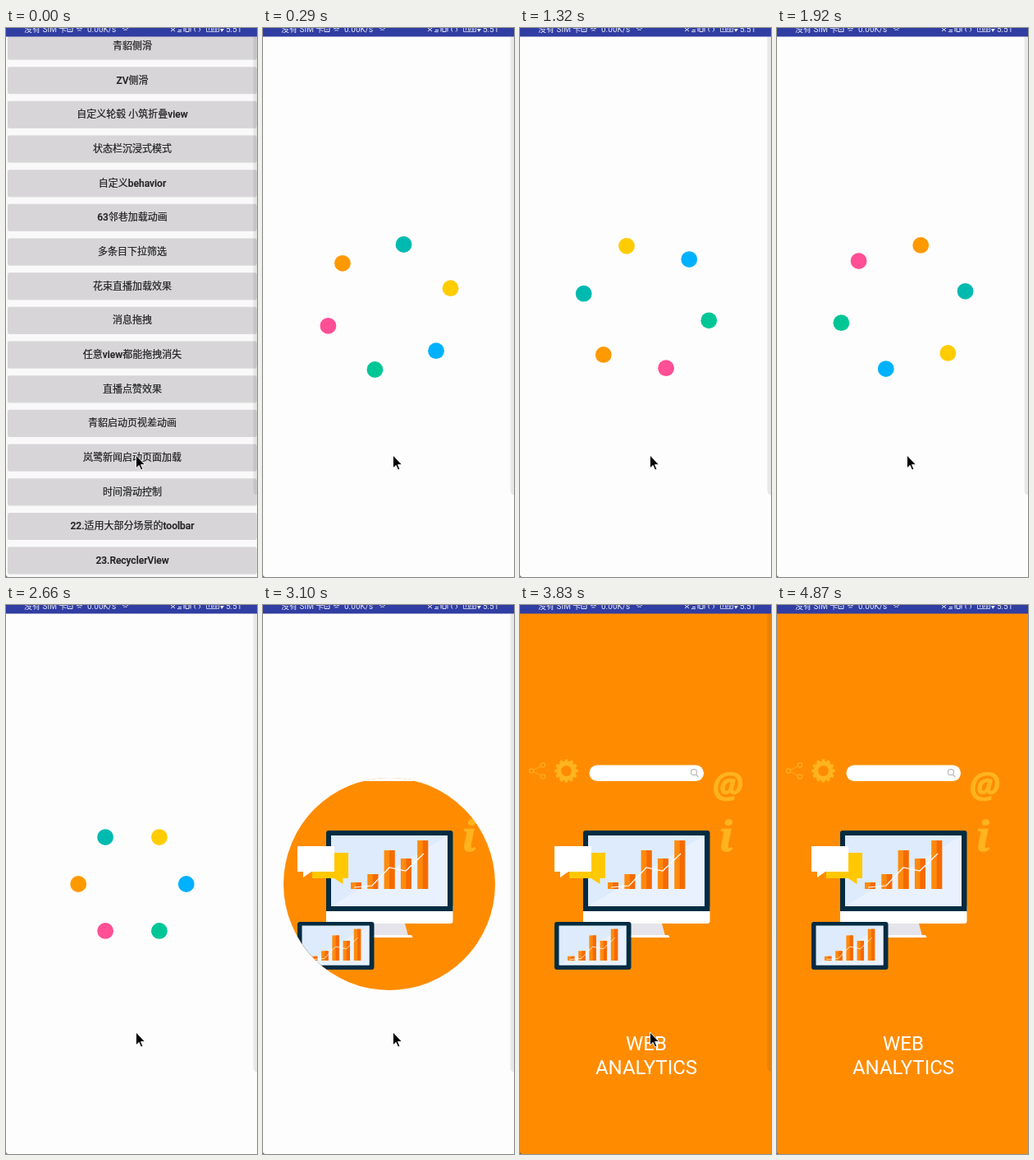
Animation, 306 px wide and 667 px high, one loop 4970 ms. Source, as an HTML page:

```html
<!DOCTYPE html>
<html lang="zh">
<head>
<meta charset="utf-8">
<title>Loading splash</title>
<style>
  html, body { margin: 0; width: 100%; height: 100%; overflow: hidden; background: #fdfdfd; }
  svg { display: block; width: 100%; height: 100%; }
  text { font-family: Roboto, "Noto Sans CJK SC", "Noto Sans CJK", sans-serif; }
  #list text { font-size: 12px; font-weight: 500; fill: #222; stroke: #222; stroke-width: .22; text-anchor: middle; }
  #status text { font-size: 10px; fill: #e4e6f6; }
  .title { font-size: 24px; fill: #fff; text-anchor: middle; }
</style>
</head>
<body>
<svg viewBox="0 0 306 667">
  <defs>
    <clipPath id="hole"><circle id="holeCircle" cx="154" cy="339" r="0"/></clipPath>
    <linearGradient id="shade">
      <stop offset="0" stop-opacity=".03"/>
      <stop offset=".4" stop-opacity=".085"/>
    </linearGradient>
    <g id="chart"></g>
  </defs>

  <rect width="306" height="667" fill="#fdfdfd"/>
  <g id="list"><rect width="306" height="667" fill="#faf9fa"/></g>
  <g id="dots"></g>

  <g id="splash" clip-path="url(#hole)">
    <rect width="306" height="667" fill="#ff8c00"/>
    <g fill="none" stroke="#ffab24">
      <path d="M28 194.500L14.500 201.500L28 208.500" stroke-width="1"/>
      <g fill="#ff8c00" stroke-width="1.200">
        <circle cx="28" cy="194.500" r="2.600"/>
        <circle cx="14" cy="201.500" r="2.600"/>
        <circle cx="28" cy="208.500" r="2.600"/>
      </g>
    </g>
    <g fill="none" stroke="#ffb41e">
      <circle cx="56.500" cy="201.500" r="9.200" stroke-width="5.400"/>
      <circle cx="56.500" cy="201.500" r="12.700" stroke-width="3" pathLength="24" stroke-dasharray="1.150 .85" stroke-dashoffset=".575"/>
    </g>
    <rect x="84.500" y="194.500" width="139.500" height="19.500" rx="9.750" fill="#fff"/>
    <path d="M214.500 206l3 3M215.500 203.200a3.500 3.500 0 1 1-7 0a3.500 3.500 0 1 1 7 0" fill="none" stroke="#b9b9b9" stroke-width="1.200"/>
    <g fill="#ffb41e" stroke="#ffb41e" stroke-width=".7" text-anchor="middle" font-weight="700">
      <text x="253" y="233.500" font-size="43" font-style="italic" style="font-family:'Open Sans','Noto Sans',sans-serif">@</text>
      <text x="251" y="299" font-size="50" font-style="italic" style="font-family:'Noto Serif',serif">i</text>
    </g>

    <path d="M135 387h38l4 15h-42z" fill="#e5e4ea"/>
    <path d="M129 404l1-3h51l1.500 3z" fill="#fff"/>
    <rect x="77" y="364" width="154.500" height="23" rx="3" fill="#fff"/>
    <path d="M77 372V277q0-3 3-3h148.500q3 0 3 3v95z" fill="#022c42"/>
    <rect x="83" y="280" width="142" height="86" fill="#ddebfc"/>
    <path d="M83 366L225 280v86z" fill="#e8f1fd"/>
    <use href="#chart"/>

    <path d="M60 301h44v31h-6.500v7l-11-7H60z" fill="#ffc800"/>
    <path d="M42 293h45v31H59l-10 7v-7h-7z" fill="#fff"/>

    <rect x="42" y="385" width="93.500" height="58" rx="3" fill="#022c42"/>
    <rect x="47.500" y="389.500" width="82" height="48" fill="#ddebfc"/>
    <path d="M47.500 437.500L129.500 389.500v48z" fill="#e8f1fd"/>
    <use href="#chart" transform="translate(-11.550 207.750) scale(.65)"/>

    <text class="title" x="154" y="541">WEB</text>
    <text class="title" x="154" y="570">ANALYTICS</text>
  </g>

  <g id="status">
    <rect width="306" height="10.500" fill="#303da2"/>
    <text x="22" y="5">没有 SIM 卡</text>
    <text x="99" y="5">0.00K/s</text>
    <text x="268" y="5">5:51</text>
    <g fill="none" stroke="#e4e6f6">
      <path d="M75 0v4.500h6V0M77 2h2M86 1q3.500-2 7 0M87.500 3.200q2-1.200 4 0M142 .5q3.500-2 7 0M143.500 2.500q2-1.200 4 0M201 0l5 4M206 0l-5 4M209 4.500h5M210 2.500h4M217 0v4.500M219 0v4.500h4V0M225 0v4.500M230 0q-1 3 1 4.500M236 0q2 3-1 4.500"/>
      <path d="M244.500 0v4.500h15V0M247.500 0v3M250.500 0v3h2V0M255 0v3h2V0" stroke-width=".8"/>
    </g>
    <path d="M261 1h5l-3 4z" fill="#e4e6f6"/>
  </g>

  <path id="strip" d="M306 10.500h-5v550q0 6 5 7z" fill="url(#shade)"/>
  <path d="M0 664q0 3 3 3H0z" fill="#555"/>
  <path id="cursor" d="M158.500 519v15.800l3.700-3.400 2.400 5.700 2.300-1-2.400-5.500h5z" stroke="#fff" stroke-width=".9"/>
</svg>

<script>
const LOOP = 4970, STEP = 147.6;
const SPIN = 0.2604;                      // degrees per ms
const MERGE_AT = 2090, HOLE_AT = 2815, PHASE = 700;
const CX = 154, CY = 339, RADIUS = 78, DIAGONAL = 363;
const COLORS = ['#ff9900', '#00bab0', '#ffcc00', '#00b1ff', '#00c696', '#ff4f95'];
const LABELS = [
  '青貂侧滑', 'ZV侧滑', '自定义轮毂 小筑折叠view', '状态栏沉浸式模式', '自定义behavior',
  '63邻巷加载动画', '多条目下拉筛选', '花束直播加载效果', '消息拖拽', '任意view都能拖拽消失',
  '直播点赞效果', '青貂启动页视差动画', '岚鹭新闻启动页面加载', '时间滑动控制',
  '22.适用大部分场景的toolbar', '23.RecyclerView'
];

const $ = id => document.getElementById(id);

function add(parent, tag, attrs, text) {
  const el = document.createElementNS('http://www.w3.org/2000/svg', tag);
  for (const key in attrs) el.setAttribute(key, attrs[key]);
  if (text) el.textContent = text;
  return parent.appendChild(el);
}

LABELS.forEach((label, i) => {
  const y = 21.5 + i * 41.67;
  const button = { x: 2, width: 303.5, height: 32, rx: 2 };
  add($('list'), 'rect', { ...button, y: y - 14.8, fill: '#000', opacity: 0.13 });
  add($('list'), 'rect', { ...button, y: y - 16, fill: '#d7d5d8' });
  add($('list'), 'text', { x: 154, y: y + 4.5 }, label);
});

[337, 327, 298, 308, 286].forEach((top, i) => {
  const x = 107 + i * 20.3, height = 345 - top;
  add($('chart'), 'rect', { x, y: top, width: 13, height, fill: '#ff8a0c' });
  add($('chart'), 'rect', { x: x + 6.5, y: top, width: 6.5, height, fill: '#f56a00' });
});
add($('chart'), 'path', {
  d: 'M111 343L133 341L154 319L174 323L196 302', fill: 'none', stroke: '#fff', 'stroke-width': 1.2
});

const dots = COLORS.map(fill => add($('dots'), 'circle', { r: 9.9, fill }));
const clamp = v => Math.min(1, Math.max(0, v));
const show = (id, on) => $(id).setAttribute('visibility', on ? 'visible' : 'hidden');
const anticipate = p => p * p * (4 * p - 3);
const easeInOut = p => (1 - Math.cos(Math.PI * p)) / 2;

function render(ms) {
  const t = Math.floor((ms + 9) / STEP) * STEP;
  const merging = t >= MERGE_AT;

  show('list', t < STEP);
  show('dots', t >= STEP && t < MERGE_AT + PHASE);
  show('splash', t >= HOLE_AT);
  show('strip', t < 32.5 * STEP);

  // Merging restarts from the resting angle.
  const start = merging ? 180 : 223 + SPIN * (t - 2 * STEP);
  const r = RADIUS * (1 - anticipate(clamp((t - MERGE_AT) / PHASE)));
  dots.forEach((dot, i) => {
    const a = (start + i * 60) * Math.PI / 180;
    dot.setAttribute('cx', CX + r * Math.cos(a));
    dot.setAttribute('cy', CY + r * Math.sin(a));
  });

  const open = easeInOut(clamp((t - HOLE_AT) / PHASE));
  $('holeCircle').setAttribute('r', open === 1 ? 400 : DIAGONAL * open);

  const leave = easeInOut(clamp((t - 4130) / 450));
  $('cursor').setAttribute('transform', `translate(0 ${leave * 152})`);
}

const begin = performance.now();
function tick() {
  render((performance.now() - begin) % LOOP);
  requestAnimationFrame(tick);
}
tick();
</script>
</body>
</html>
```
